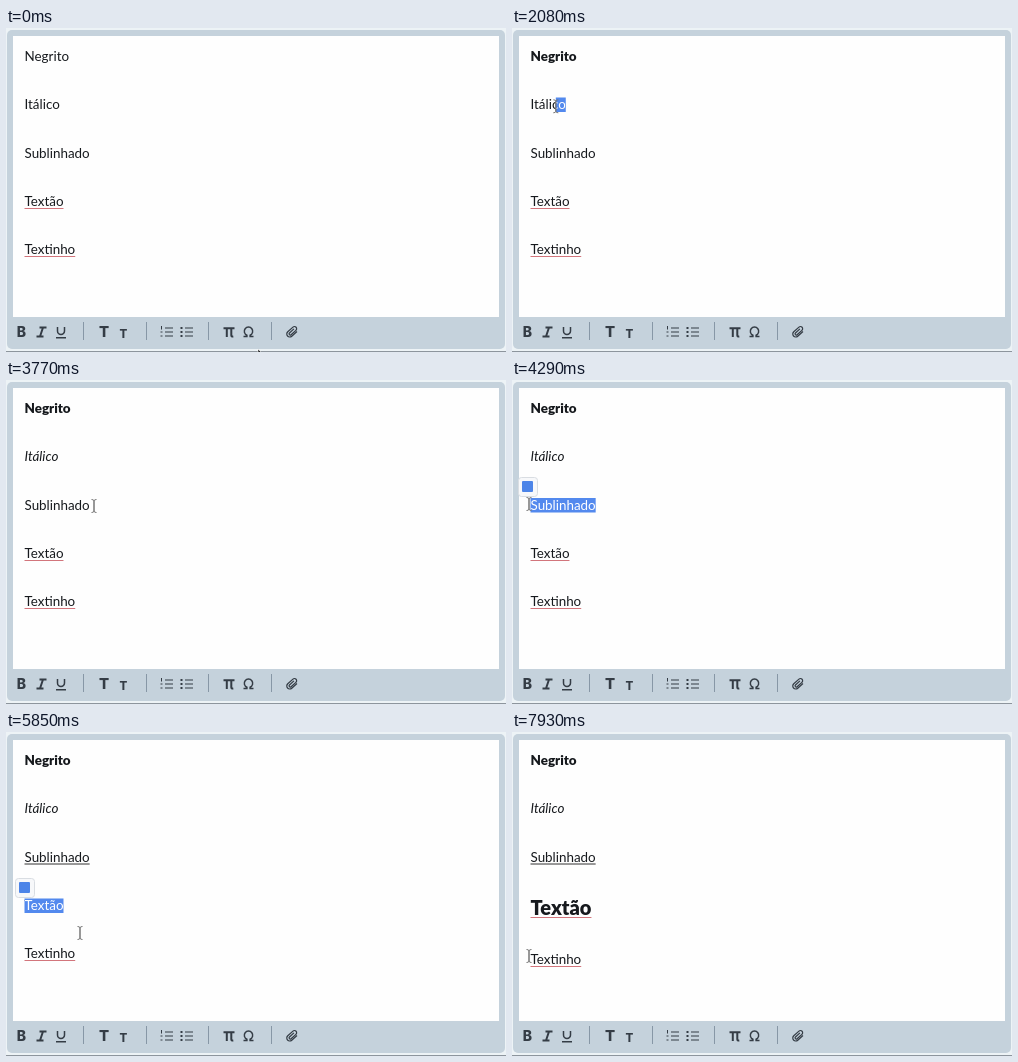
An HTML page that plays this animation: 500x324 px, repeating every 8 s.

```html
<!DOCTYPE html>
<html lang="pt">
<head>
<meta charset="utf-8">
<style>
html, body { margin: 0; width: 500px; height: 324px; overflow: hidden; background: #edf3f6; }
svg { display: block; }
text { font: 13.4px Lato, sans-serif; fill: #16191d; }
.bar text { font: 800 14px Inter, sans-serif; fill: #343c45; text-anchor: middle; }
.bar path { stroke: #343c45; fill: none; }
.bar .sep { stroke: #8797a6; }
.bar .on text { fill: #fff; }
.tip text { font: 10.7px Inter, sans-serif; text-anchor: middle; }
.tip { filter: drop-shadow(0 1px 9px #0002); }
</style>
</head>
<body>
<svg width="500" height="324" viewBox="0 0 500 324">
  <rect x="1" y="2" width="498" height="319" rx="5" fill="#c5d2dc"/>
  <rect x="7" y="8" width="486" height="281" fill="#fefefe"/>
  <path d="M0 323.5H500" stroke="#8d959d"/>
  <g id="page"></g>
  <g class="bar">
    <rect id="active" y="294" width="18" height="19" rx="5" fill="#fff"/>
    <text x="15.5" y="309">B</text>
    <path d="M33.5 299.5h7M30.5 308.5h7M37 299.5l-3 9" stroke-width="2"/>
    <path d="M51.5 299v4a3.5 3.5 0 0 0 7 0v-4M50 309.8h10" stroke-width="1.5"/>
    <path class="sep" d="M77.5 294v18M140.5 294v18M202.5 294v18M265.5 294v18"/>
    <g id="title">
      <rect x="89" y="295" width="18" height="18" rx="5" fill="#343c45"/>
      <text x="98" y="309" style="font-size:15px">T</text>
    </g>
    <text x="117.5" y="309.5" style="font-size:11.5px">T</text>
    <path d="M159 300h8M159 304h8M159 308h8M179 300h8M179 304h8M179 308h8" stroke-width="1.2"/>
    <path d="M155.5 298v3.5M154.5 304h2M154.5 308h2" stroke-width="1"/>
    <path d="M174.5 300h2M174.5 304h2M174.5 308h2" stroke-width="1.8"/>
    <path d="M217.5 300.3h11M220.8 300v9M225.3 300v7.2q0 1.6 2 1.3" stroke-width="2"/>
    <path d="M237.5 308.5h3.4v-1.3a4.2 4.2 0 1 1 3.2 0v1.3h3.4" stroke-width="1.5"/>
    <path transform="translate(286 304) rotate(-42)" stroke-width="1.2"
      d="M4 3H-3a3 3 0 0 1 0-6H4a2.2 2.2 0 0 1 0 4.4H-2.5a1.2 1.2 0 0 1 0-2.4H3.5"/>
  </g>
  <g id="tip" class="tip">
    <path d="M77 245h52q6 0 6 6v21q0 6-6 6h-26l-4.500 5-4.500-5H77q-6 0-6-6v-21q0-6 6-6z" fill="#fff"/>
    <text x="103" y="265">Título</text>
  </g>
  <g id="badge">
    <rect x="-9.500" y="-9.500" width="19" height="19" rx="3" fill="#f7f8fa" stroke="#d9dde2"/>
    <rect x="-6" y="-6" width="11" height="11" rx="1" fill="#4c84e8"/>
  </g>
  <g id="pointer">
    <path d="M0 0V11.500L2.700 9 4.500 13 6.300 12.200 4.600 8.400H8z" fill="#111" stroke="#fff" stroke-width=".6"/>
    <path d="M-2.500-6.500Q0-6.500 0-5V5Q0 6.500-2.500 6.500M2.500-6.500Q0-6.500 0-5V5Q0 6.500 2.500 6.500" fill="none" stroke="#777"/>
    <path d="M-1.300 0Q0-1.500 1.300 0V4L5 5Q6 5.500 5.600 7L4.600 11H-1.800L-4.800 7Q-4.500 5.300-1.300 7z" fill="#fff" stroke="#222" stroke-width=".9"/>
  </g>
</svg>
<script>
const LOOP = 8000, STEP = 130, LEFT = 18.5, TITLE_AT = 6370;
const $ = id => document.getElementById(id);

// drag: selection start and end; done: selection cleared; styled: format applied
const lines = [
  { text: 'Negrito', y: 33, drag: [600, 1040], styled: 1560, done: 1950, css: 'font-weight:900', button: 6.5, badge: [5, 46, 1040] },
  { text: 'Itálico', y: 81, drag: [1950, 2340], styled: 2990, done: 3640, css: 'font-style:italic', button: 26.5, badge: [9, 94, 2730] },
  { text: 'Sublinhado', y: 129.5, drag: [3770, 4290], styled: 4680, done: 5200, line: '#333', button: 46, badge: [16, 107, 4290] },
  { text: 'Textão', y: 178, drag: [5200, 5590], styled: TITLE_AT, done: 7280, css: 'font-size:20px;font-weight:900', spell: true, badge: [19, 156, 5590] },
  { text: 'Textinho', y: 226, spell: true }
];

// time, x, y of the pointer
const route = [
  [0, 252, 321], [130, 240, 300], [600, 66, 29], [1040, 0, 32], [1300, 0, 32],
  [1950, 56, 77], [2340, 9, 82], [3250, 9, 82], [3770, 88, 126], [4290, 17, 124],
  [4680, 17, 124], [5200, 62, 174], [5330, 62, 174], [5590, 18, 172], [5720, 36, 180],
  [5850, 74, 201], [6110, 98, 302], [6890, 98, 302], [7280, 92, 236], [7800, 17, 224], [LOOP, 17, 224]
];

const ease = k => k * k * (3 - 2 * k);

function pointerAt(t) {
  const i = route.findIndex(p => p[0] > t), a = route[i - 1], b = route[i];
  const k = ease((t - a[0]) / (b[0] - a[0]));
  return [a[1] + (b[1] - a[1]) * k, a[2] + (b[2] - a[2]) * k];
}

const show = (el, on) => el.setAttribute('visibility', on ? 'visible' : 'hidden');
const place = (el, x, y) => el.setAttribute('transform', `translate(${x} ${y})`);

function add(tag, attrs, text = '') {
  const el = document.createElementNS('http://www.w3.org/2000/svg', tag);
  for (const key in attrs) el.setAttribute(key, attrs[key]);
  el.textContent = text;
  return $('page').appendChild(el);
}

function drawLine(line, t, px) {
  const styled = t >= line.styled, big = styled && line.spell;
  const y = big ? 183 : line.y + (line.text === 'Textinho' && t >= TITLE_AT ? 6 : 0);
  const look = { x: LEFT, y, style: styled && line.css || '' };
  const label = add('text', look, line.text);
  const end = LEFT + label.getComputedTextLength();
  const selected = line.drag && t >= line.drag[0] && t < line.done;
  const color = styled && line.line || (line.spell && !selected && '#d2757c');
  if (color) add('path', { d: `M${LEFT} ${y + 2.5}H${end}`, stroke: color });
  if (!selected) return;

  const x = t < line.drag[1] ? Math.min(end, Math.max(LEFT, px)) : LEFT;
  const top = big ? 166 : y - 11.5, height = big ? 22 : 14.5;
  add('rect', { x, y: top, width: end - x, height, fill: '#5389ee' });
  look.style += `;fill:#fff;clip-path:polygon(${[[x, top], [end, top], [end, top + height], [x, top + height]]
    .map(p => `${p[0] - label.getBBox().x}px ${p[1] - label.getBBox().y}px`)})`;
  add('text', look, line.text);
}

function draw(t) {
  const [x, y] = pointerAt(t);
  $('page').replaceChildren();
  lines.forEach(line => drawLine(line, t, x));

  const format = lines.find(l => l.button && t >= l.styled && t < l.done);
  show($('active'), format);
  if (format) $('active').setAttribute('x', format.button);

  const tagged = lines.find(l => l.badge && t >= l.badge[2] && t < Math.min(l.done, TITLE_AT));
  show($('badge'), tagged);
  if (tagged) place($('badge'), tagged.badge[0], tagged.badge[1]);

  const hover = x > 89 && x < 107 && y > 295 && y < 313;
  $('title').classList.toggle('on', hover);
  show($('title').firstElementChild, hover);
  show($('tip'), hover);

  const inPage = x >= 7 && x < 493 && y >= 8 && y < 289;
  const kind = hover ? 2 : inPage ? 1 : 0;
  [...$('pointer').children].forEach((el, i) => show(el, i === kind));
  place($('pointer'), x, y);
}

let last = -1;
function tick() {
  const t = Math.floor(performance.now() % LOOP / STEP) * STEP;
  if (t !== last) draw(last = t);
  requestAnimationFrame(tick);
}
tick();
</script>
</body>
</html>
```
